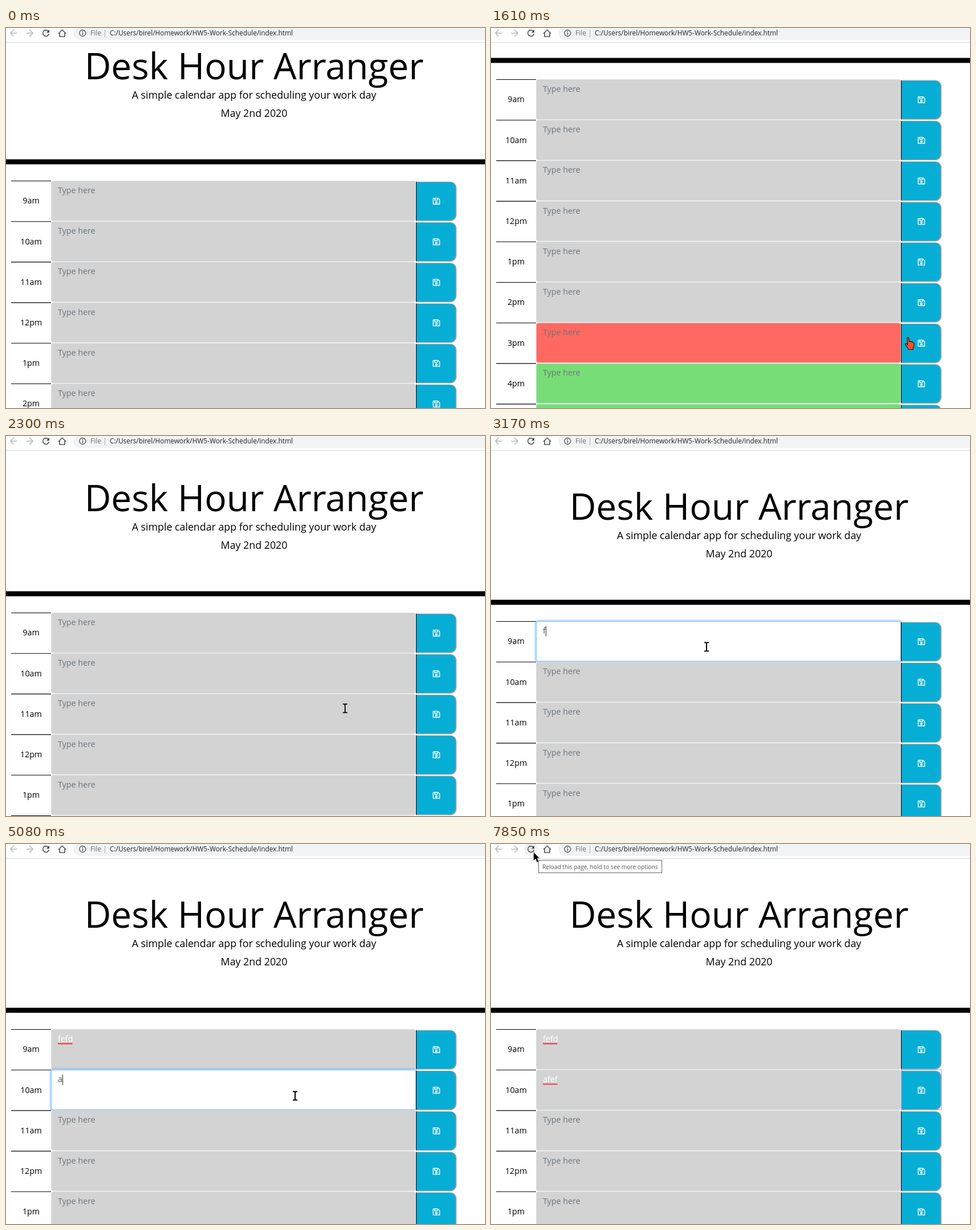
Write an HTML page that moves like this. It is 840 px wide and 667 px high and loops after 8 s.

```html
<!DOCTYPE html>
<html lang="en">
<head>
<meta charset="utf-8">
<title>Desk Hour Arranger</title>
<style>
  html, body { margin: 0; width: 100%; height: 100%; overflow: hidden; background: #fff; }
  svg { display: block; width: 100vw; height: 100vh; font-family: "Open Sans", "Noto Sans", sans-serif; }
  .row { font-size: 14.24px; }
  .mid { text-anchor: middle; }
  .line { fill: none; stroke-width: 1.6; }
</style>
</head>
<body>
<svg id="stage" viewBox="0 0 840 667">
  <defs>
    <g id="save">
      <path d="M719 1.5h60a11 11 0 0 1 11 11v47a11 11 0 0 1-11 11h-60z" fill="#8e9ca1"/>
      <path d="M719 2.5h60a9 9 0 0 1 9 9v47.500a10 10 0 0 1-10 10h-59z" fill="#06aed5"/>
      <path d="M719.500 1.500v68.500" stroke="#000"/>
      <g fill="none" stroke="#fff" stroke-width="1.400">
        <path d="M749.700 30.400h8l2.800 2.800v7.800h-11.300v-10.100z" stroke-linejoin="round"/>
        <path d="M751.700 30.500v3.300h5v-3.300"/>
        <circle cx="754.800" cy="37.600" r="1.500"/>
      </g>
    </g>
    <path id="arrow" d="M0 0V15.500L3.500 12.200 6.300 18.400 9.200 17.100 6.500 11.200H11z" stroke="#fff" stroke-width=".6"/>
    <g id="beam">
      <path d="M-4-7.500h3l1 1 1-1h3M-4 7.500h3l1-1 1 1h3M0-7v14" fill="none" stroke="#fff" stroke-width="3.600" opacity=".7"/>
      <path d="M-4-7.500h3l1 1 1-1h3M-4 7.500h3l1-1 1 1h3M0-7v14" fill="none" stroke="#000" stroke-width="2"/>
    </g>
    <path id="hand" d="M-1.200 1.500C-1.200-.3 1.600-.3 1.700 1.500L2.400 7.500C4 6.300 5.400 6.900 5.700 8 7 7.200 8.200 7.900 8.400 9 10 8.600 10.900 9.500 10.900 11.200L10.400 16C10 18 9 19 8.700 21.500H1.300C.8 19-2.500 16-4.500 12.600-5.200 11-3.400 10-2 11.300L-.4 13z" fill="#f0512a" stroke="#2a0d05" stroke-width="1.100" stroke-linejoin="round"/>
  </defs>

  <rect width="840" height="667" fill="#fff"/>
  <g id="page">
    <g class="mid">
      <text x="435" y="147" font-size="64">Desk Hour Arranger</text>
      <text x="435" y="181" font-size="17.800">A simple calendar app for scheduling your work day</text>
      <text x="435" y="213" font-size="17.800">May 2nd 2020</text>
    </g>
    <rect y="287.500" width="840" height="8.800"/>
    <g id="rows" class="row"></g>
  </g>

  <g id="toolbar">
    <rect width="840" height="26" fill="#fff"/>
    <path d="M0 25.500h840" stroke="#dcdee1"/>
    <path d="M840-4H130.500a12.500 12.500 0 0 0 0 25H840z" fill="#f1f3f4"/>
    <g class="line" stroke="#b9bbbe">
      <path d="M19.500 9H8M13.500 3.300 7.800 9l5.700 5.700"/>
      <path d="M35.500 9H47M41.500 3.300 47.200 9l-5.700 5.700"/>
    </g>
    <circle id="hover" cx="70" cy="9" r="12.500" fill="#f1f2f3"/>
    <g class="line" stroke="#4b4f54">
      <path d="M74.400 5.800A5.400 5.400 0 1 0 75.300 10.300"/>
      <path d="M92 9.800 98.500 3.300 105 9.800M94 8.500V15h9V8.500"/>
    </g>
    <path d="M76 2.800V8.200H70.600z" fill="#4b4f54"/>
    <circle cx="134.300" cy="9" r="5.500" fill="none" stroke="#4b4f54" stroke-width="1.300"/>
    <path d="M134.300 8.300v3.700M134.300 5.700v1.500" stroke="#4b4f54" stroke-width="1.400"/>
    <text x="148" y="13.300" font-size="12" fill="#6b7075">File</text>
    <path d="M173.500 3v13" stroke="#a9adb1"/>
    <text x="182" y="13.300" font-size="11.850" fill="#202124">C:/Users/birel/Homework/HW5-Work-Schedule/index.html</text>
  </g>
  <g id="tip">
    <rect x="83.500" y="28.500" width="216" height="22" fill="#fff" stroke="#666"/>
    <text x="90" y="43.500" font-size="10.200" fill="#575757">Reload this page, hold to see more options</text>
  </g>
  <use id="cursor"/>
</svg>

<script>
const LOOP = 8000, TOP = 325.3, PITCH = 71.2, LEFT = 91;
const $ = id => document.getElementById(id);

const hours = ["9am", "10am", "11am", "12pm", "1pm", "2pm", "3pm", "4pm", "5pm"];
const fillOf = i => i < 6 ? "#d3d3d3" : i === 6 ? "#ff6961" : "#77dd77";

// What is typed in the first two rows, and when each key, focus and save happens
const entries = [
  { text: "fefd", keys: [3170, 3320, 3480, 3690], focus: 2720, blur: 4130, mark: 4300, ring: [4170, 4900] },
  { text: "afef", keys: [5080, 5310, 5460, 5620], focus: 4880, blur: 6060, mark: 6450, ring: [6080, LOOP] }
];

const scrollKeys = [[0, 57], [1000, 57], [1070, 82], [1220, 181], [1370, 235],
  [1880, 235], [2070, 192], [2320, 0]];

const mouseKeys = [[330, 741, 630], [470, 713, 597], [690, 731, 543], [800, 731, 543],
  [920, 730, 543], [1600, 730, 543], [1610, 731, 543], [1880, 731, 543],
  [2070, 717, 539], [2710, 378, 370], [3480, 378, 370], [3780, 545, 433],
  [4090, 716, 384], [4180, 735, 362], [4400, 735, 362], [4620, 655, 450],
  [4770, 560, 497], [4950, 507, 442], [5540, 507, 442], [5800, 610, 527],
  [6060, 738, 423], [6400, 738, 423], [6690, 283, 224], [6870, 283, 224],
  [7160, 83, 14], [7240, 83, 14], [7470, 76, 14], [7560, 76, 14], [7710, 74.5, 14]];

// Linear interpolation through [time, ...values]
function at(keys, t) {
  let i = keys.findIndex(k => k[0] > t);
  if (i < 0) i = keys.length;
  const a = keys[Math.max(0, i - 1)], b = keys[Math.min(keys.length - 1, i)];
  const p = b[0] > a[0] ? (t - a[0]) / (b[0] - a[0]) : 0;
  return a.slice(1).map((v, n) => v + (b[n + 1] - v) * p);
}

const ramp = (t, start, span = 150) => {
  const p = Math.min(1, Math.max(0, (t - start) / span));
  return p * p * (3 - 2 * p);
};

const show = (node, on) => node.setAttribute("visibility", on ? "visible" : "hidden");

const field = (attrs, grow = 0) =>
  `<rect x="${79.5 - grow}" y="${0.3 - grow}" width="${639 + 2 * grow}" height="${69.6 + 2 * grow}" rx="${3.5 + grow}" ${attrs}/>`;

$("rows").innerHTML = hours.map((hour, i) => `
  <g transform="translate(0 ${TOP + i * PITCH})">
    <path d="M9 .2h70" stroke="#000" stroke-width="1.100"/>
    <text class="mid" x="44" y="40">${hour}</text>
    ${field(`fill="${fillOf(i)}" stroke="#ced4da" stroke-opacity=".5"`)}
    <g class="focus" opacity="0">
      ${field('fill="none" stroke="#007bff" stroke-opacity=".25" stroke-width="3"', 1.7)}
      ${field('fill="#fff" stroke="#80bdff"')}
    </g>
    <text class="note" x="${LEFT}" y="21.800" fill="#6c757d">Type here</text>
    <path class="mark" fill="none" stroke="#e8242c" stroke-width="1.100"/>
    <path class="caret" stroke="#222" visibility="hidden"/>
    <use href="#save"/>
    <rect class="ring" x="719.500" y="-.2" width="70.500" height="70.200" fill="none" stroke="#8fb0f3" visibility="hidden"/>
  </g>`).join("");

entries.forEach((e, i) => {
  const row = $("rows").children[i];
  for (const part of ["focus", "note", "mark", "caret", "ring"]) e[part + "El"] = row.querySelector("." + part);
});

function squiggle(width) {
  let d = `M${LEFT} 26`;
  for (let x = 1.5, up = true; x <= width; x += 1.5, up = !up) d += `L${LEFT + x} ${up ? 24.2 : 26}`;
  return d;
}

function drawEntry(e, t) {
  const count = e.keys.filter(k => k <= t).length;
  const level = ramp(t, e.focus) - ramp(t, e.blur);
  const active = t >= e.focus + 40 && t < e.blur;
  e.focusEl.setAttribute("opacity", level);
  e.noteEl.textContent = count ? e.text.slice(0, count) : "Type here";
  e.noteEl.setAttribute("fill", !count ? "#6c757d" : level > 0.5 ? "#495057" : "#fff");
  const width = count ? e.noteEl.getComputedTextLength() : 0;
  const x = LEFT + width + 0.5;
  e.caretEl.setAttribute("d", `M${x} 8v18.500`);
  show(e.caretEl, active);
  e.markEl.setAttribute("d", t >= e.mark ? squiggle(width) : "");
  show(e.ringEl, t >= e.ring[0] && t < e.ring[1]);
}

function draw(t) {
  const scroll = Math.round(at(scrollKeys, t)[0]);
  $("page").setAttribute("transform", `translate(0 ${-scroll})`);
  entries.forEach(e => drawEntry(e, t));

  const [x, y] = at(mouseKeys, t);
  const kind = y < 296 - scroll ? "arrow" : x > 719 ? "hand" : "beam";
  $("cursor").setAttribute("href", "#" + kind);
  $("cursor").setAttribute("transform", `translate(${x} ${y})`);
  show($("cursor"), t >= 380);
  show($("hover"), t >= 7300);
  show($("tip"), t >= 7850);
}

const start = performance.now();
function tick() {
  draw((performance.now() - start) % LOOP);
  requestAnimationFrame(tick);
}
tick();
</script>
</body>
</html>
```
